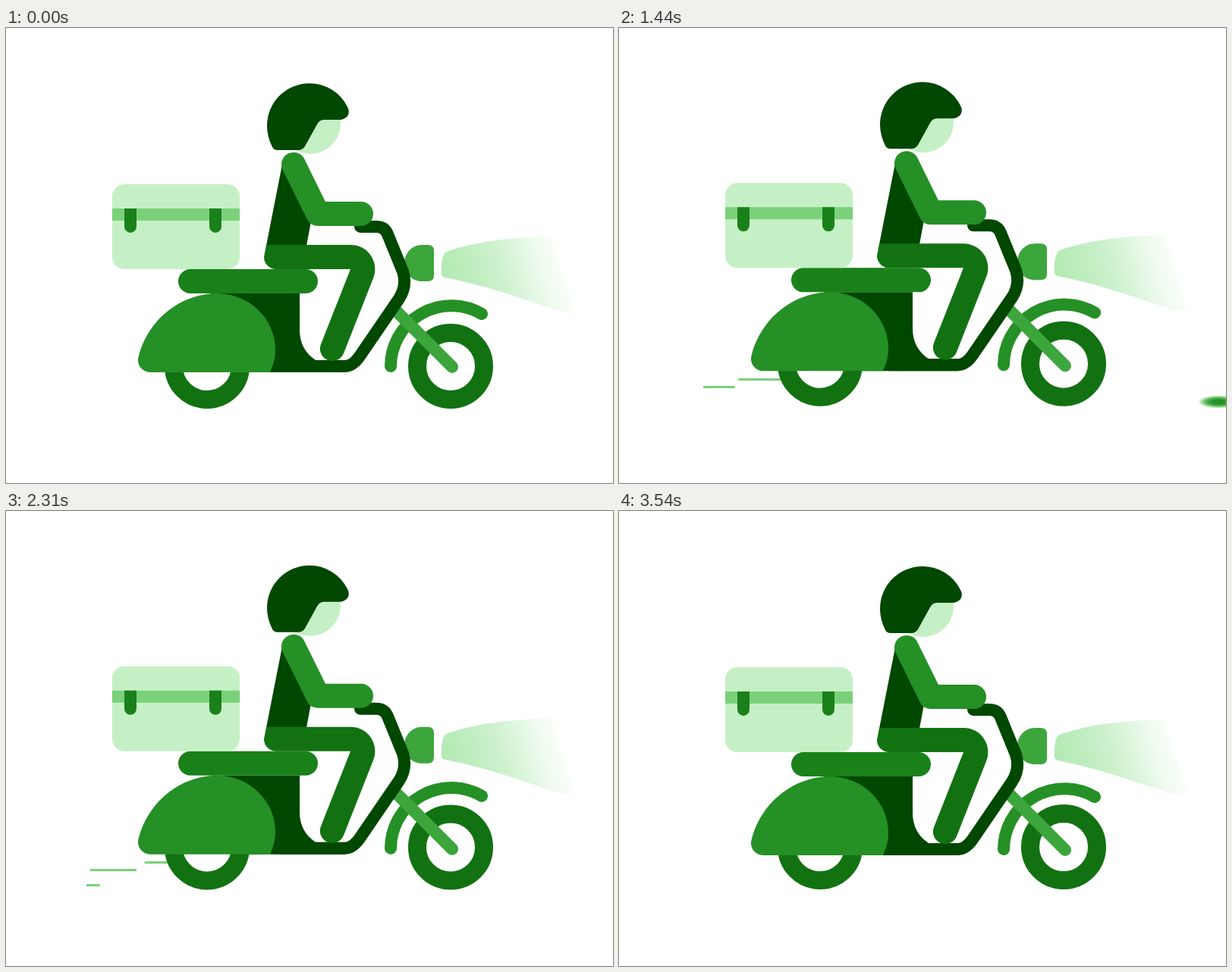
These frames come from a looping animation (800 px wide and 600 px high, 3570 ms). An HTML page:

```html
<!DOCTYPE html>
<html lang="en">
<head>
<meta charset="utf-8">
<title>Scooter delivery</title>
<style>
html, body { margin: 0; width: 100%; height: 100%; overflow: hidden; background: #fff; }
svg { display: block; width: 100vw; height: 100vh; }
</style>
</head>
<body>
<svg viewBox="0 0 800 600">
  <defs>
    <linearGradient id="glow" gradientUnits="userSpaceOnUse" x1="574" y1="322" x2="734" y2="280">
      <stop offset="0" stop-color="#b2e9b2"/>
      <stop offset=".45" stop-color="#cdf1cd"/>
      <stop offset=".8" stop-color="#f1fbf1"/>
      <stop offset="1" stop-color="#fcfefc"/>
    </linearGradient>
    <radialGradient id="pale">
      <stop offset=".3" stop-color="#259025"/>
      <stop offset=".6" stop-color="#4db04d"/>
      <stop offset=".85" stop-color="#a8dfa8"/>
      <stop offset="1" stop-color="#effaef"/>
    </radialGradient>
    <radialGradient id="deep">
      <stop offset=".3" stop-color="#045204"/>
      <stop offset=".6" stop-color="#278427"/>
      <stop offset=".85" stop-color="#9fd89f"/>
      <stop offset="1" stop-color="#effaef"/>
    </radialGradient>
  </defs>

  <path id="streaks" fill="none" stroke="#7ad17a" stroke-width="3"/>
  <g id="bump">
    <ellipse rx="26" ry="8.5" fill="url(#pale)"/>
    <ellipse id="dark" rx="26" ry="8.5" fill="url(#deep)"/>
  </g>

  <g id="wheels" fill="none" stroke="#127212" stroke-width="24">
    <circle cx="265" cy="446" r="44"/>
    <circle cx="586" cy="446" r="44"/>
  </g>

  <g id="rider">
    <path fill="url(#glow)" d="M574 324Q573 308 577 299Q578 296 583 294C620 282 660 276 718 275L748 370Q745 376 730 373C690 361 640 341 578 329Q574 328 574 324Z"/>
    <g fill="none" stroke-width="16" stroke-linecap="round">
      <path stroke="#259025" d="M507 446A80 80 0 0 1 627 377"/>
      <path stroke="#3ca53c" d="M515 374L588 447"/>
    </g>
    <path fill="#3ca53c" d="M548 286H556Q564 286 564 294V326Q564 334 556 334H548C535 334 525 324 525 310C525 297 535 286 548 286Z"/>
    <path fill="#004700" d="M270 350H387V398Q387 424 408 438H447V454H300Z"/>
    <path fill="none" stroke="#004700" stroke-width="16" stroke-linecap="round" d="M467 262H488Q499 262 503 272L523 321Q529 340 518 357L466 433Q457 446 446 446H356"/>
    <path fill="#259025" d="M190 454A16 16 0 0 1 174.5 434C186 386 229 350 278 350C321 350 355 384 355 424C355 436 352 445 348 454Z"/>
    <rect x="227" y="318" width="184" height="32" rx="16" fill="#1a811a"/>
    <path fill="#004700" d="M364 180L343 287H396L402 255L380 180Z"/>
    <path fill="#127212" d="M343 286H454A32 32 0 0 1 484 330L445 429A16 16 0 0 1 415 417L454 318H356A16 16 0 0 1 340 302Z"/>
    <path fill="none" stroke="#259025" stroke-width="32" stroke-linecap="round" stroke-linejoin="round" d="M379 180L411 245H468"/>
    <circle cx="401" cy="126" r="40" fill="#c5f0c5"/>
    <path fill="#004700" d="M358 161H385Q391 161 394 156L410 127Q413 121 419 121H439C449 121 455 113 450 104A56 56 0 0 0 400 73A56 56 0 0 0 344 129Q344 143 351 157Q353 161 358 161Z"/>
    <g id="crate">
      <rect x="140" y="206" width="168" height="112" rx="16" fill="#c5f0c5"/>
      <path fill="#7ad17a" d="M140 238H308V254H140Z"/>
      <path fill="#1a811a" d="M156 238H172V262A8 8 0 0 1 156 262ZM268 238H284V262A8 8 0 0 1 268 262Z"/>
    </g>
  </g>
</svg>
<script>
const STEP = 30, FRAMES = 119, BOB = 14.75, SPEED = 10.1;
const el = id => document.getElementById(id);
const [streaks, bump, dark, wheels, rider, crate] =
  ["streaks", "bump", "dark", "wheels", "rider", "crate"].map(el);

const clamp = (v, a = 0, b = 1) => Math.min(b, Math.max(a, v));
const hop = (n, from, span) => Math.sin(Math.PI * clamp((n - from) / span));
const bob = (n, height, lag) => height / 2 * (Math.cos(2 * Math.PI * (n / BOB - lag)) - 1);
const shift = (node, y) => node.setAttribute("transform", `translate(0 ${y.toFixed(2)})`);

// Each streak slides left through its own window, once per start time.
const lanes = [
  { y: 463.5, left: 131, right: 226, len: 61, starts: [3.4, 22, 41.2, 54.9, 72.7, 90.6] },
  { y: 473.5, left: 111, right: 214, len: 61, starts: [0, 19, 35.9, 50.7, 66.8, 86.3] },
  { y: 493.5, left: 106, right: 210, len: 52, starts: [10.3, 29, 48, 63.3, 81.5, 99.9] }
];

function streakPath(n) {
  let d = "";
  for (const lane of lanes) {
    for (const s of lane.starts) {
      const x = lane.right - SPEED * (n - s);
      const a = clamp(x, lane.left, lane.right);
      const b = clamp(x + lane.len, lane.left, lane.right);
      if (b - a > 0.5) d += `M${a.toFixed(1)} ${lane.y}H${b.toFixed(1)}`;
    }
  }
  return d;
}

function draw(n) {
  const jump = -17 * hop(n, 53, 12);
  shift(rider, bob(n, 4, 0.03) + jump);
  const settle = -3 * clamp((n - 112) / 6);
  shift(wheels, Math.min(bob(n, 7, 0.015), settle) + jump);

  const toss = hop(n, 58, 14);
  crate.setAttribute("transform", `translate(0 ${-18.5 * toss}) rotate(${4.1 * toss} 224 262)`);

  bump.setAttribute("visibility", n >= 46 && n <= 68 ? "visible" : "hidden");
  bump.setAttribute("transform", `translate(${790 - 35 * (n - 48)} 493)`);
  dark.setAttribute("opacity", clamp((n - 48) / 12));
  streaks.setAttribute("d", streakPath(n));
}

const begin = performance.now();
function tick() {
  const t = Math.max(0, performance.now() - begin);
  draw(Math.floor(t / STEP) % FRAMES);
  requestAnimationFrame(tick);
}
tick();
</script>
</body>
</html>
```
